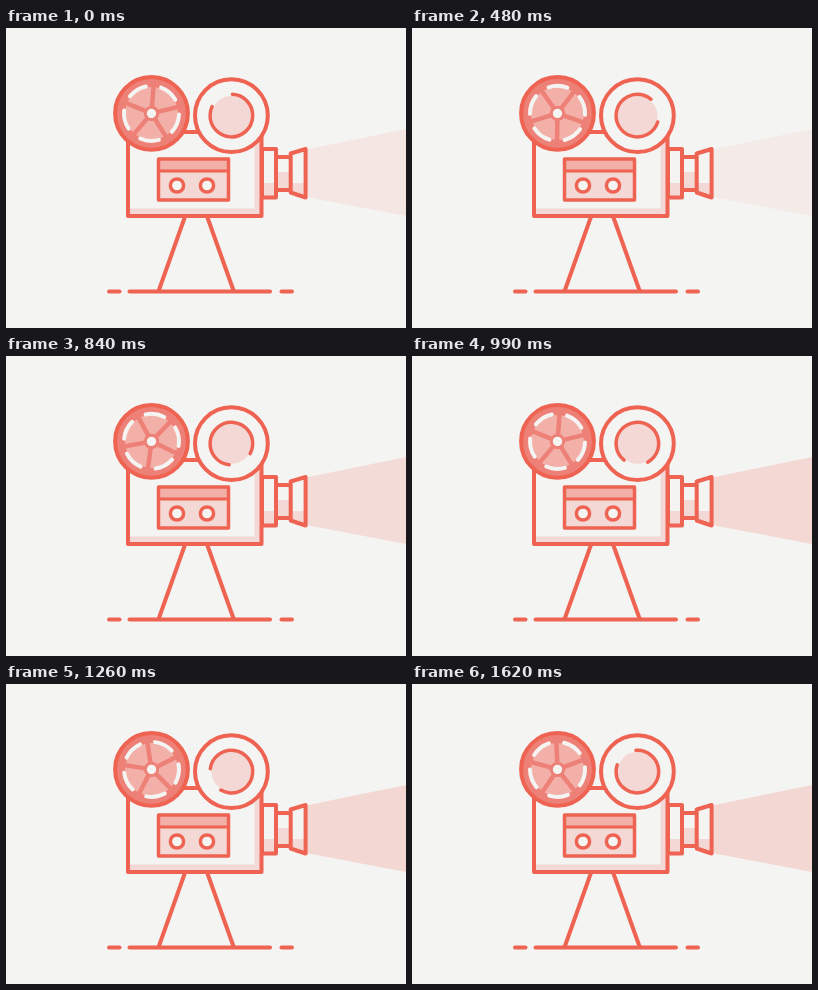
An HTML page with a canvas that plays this animation: 400 px wide and 300 px high, repeating every 1650 ms.

```html
<!DOCTYPE html>
<html lang="en">
<head>
<meta charset="utf-8">
<title>Film projector</title>
<style>
html, body { margin: 0; width: 100%; height: 100%; overflow: hidden; background: #f4f4f2; }
canvas { display: block; width: 400px; height: 300px; }
</style>
</head>
<body>
<canvas id="stage" width="400" height="300"></canvas>
<script>
const ctx = document.getElementById('stage').getContext('2d');
const LOOP = 1650, STEP = 30, TAU = Math.PI * 2;
const CORAL = '#ee6352', PAPER = '#f4f4f2';
const PALE = '#f4d8d5', ROSE = '#f2b0a9', REEL = '#ee8177';
// time in ms, beam opacity
const BEAM = [[0, .09], [210, .12], [480, .065], [540, .14], [840, .17], [1110, .2], [1650, .2]];

function paint(fill, stroke, width) {
  if (fill) { ctx.fillStyle = fill; ctx.fill(); }
  if (stroke) {
    ctx.strokeStyle = stroke;
    ctx.lineWidth = width;
    ctx.stroke();
  }
}

function shape(points, fill, stroke, width = 4) {
  ctx.beginPath();
  points.forEach(([x, y]) => ctx.lineTo(x, y));
  if (points.length > 2) ctx.closePath();
  paint(fill, stroke, width);
}

function box(x, y, w, h, fill, stroke, width) {
  shape([[x, y], [x + w, y], [x + w, y + h], [x, y + h]], fill, stroke, width);
}

function circle(x, y, r, fill, stroke, width = 4) {
  ctx.beginPath();
  ctx.arc(x, y, r, 0, TAU);
  paint(fill, stroke, width);
}

function arc(r, from, to, color, width) {
  ctx.beginPath();
  ctx.arc(0, 0, r, from, to);
  paint(null, color, width);
}

function line(x1, y1, x2, y2, width = 4) {
  shape([[x1, y1], [x2, y2]], null, CORAL, width);
}

function beamAlpha(t) {
  const i = BEAM.findIndex(key => key[0] > t);
  const [t0, a0] = BEAM[i - 1], [t1, a1] = BEAM[i];
  return a0 + (a1 - a0) * (t - t0) / (t1 - t0);
}

function drawBeam(t) {
  ctx.globalAlpha = beamAlpha(t);
  shape([[300, 121.5], [400, 101], [400, 188], [300, 169]], CORAL);
  ctx.globalAlpha = 1;
}

function drawStand() {
  line(178.9, 189, 152.6, 263);
  line(201.3, 189, 227.7, 263);
  line(123.5, 263.6, 264, 263.6);
  line(103, 263.6, 113.5, 263.6);
  line(275.5, 263.6, 286, 263.6);
}

function drawLens() {
  box(270, 129, 15, 33, PAPER);
  box(270, 144, 15, 18, PALE);
  box(270, 129, 15, 33, null, CORAL);
  box(256, 121, 14, 48.5, PAPER);
  box(256, 155, 14, 14.5, PALE);
  box(256, 121, 14, 48.5, null, CORAL);
  const hood = [[284.7, 125.5], [299.6, 121], [299.6, 169.5], [284.7, 164.5]];
  shape(hood, PAPER);
  shape([[284.7, 155], [299.6, 155], ...hood.slice(2)], PALE);
  shape(hood, null, CORAL);
}

function drawBody() {
  box(122, 104, 133.5, 84, PAPER);
  box(122, 180.5, 133.5, 7.5, PALE);
  box(248.5, 104, 7, 84, PALE);
  box(122, 104, 133.5, 84, null, CORAL);
  box(152.5, 131, 70, 41, PALE);
  box(152.5, 131, 70, 12, ROSE);
  line(153, 143, 222, 143, 3);
  box(152.5, 131, 70, 41, null, CORAL, 3.5);
  circle(171, 157.5, 6.6, PAPER, CORAL, 3.5);
  circle(201, 157.5, 6.6, PAPER, CORAL, 3.5);
}

function drawReel(turn) {
  circle(145.5, 85.4, 36.4, REEL, CORAL);
  ctx.save();
  ctx.translate(145.5, 85.4);
  ctx.rotate(turn - .24);
  circle(0, 0, 26.5, ROSE);
  for (let i = 0; i < 5; i++) {
    arc(27.5, .28, TAU / 5 - .28, PAPER, 4);
    shape([[0, 0], [26.5, 0]], null, REEL, 4.5);
    ctx.rotate(TAU / 5);
  }
  circle(0, 0, 6.2, PAPER, REEL, 3);
  ctx.restore();
}

function drawSpool(turn) {
  circle(225.4, 87.6, 36.4, PAPER, CORAL);
  circle(225.6, 87.8, 20, PALE);
  ctx.save();
  ctx.translate(225.4, 87.6);
  ctx.rotate(turn);
  arc(21.3, 4.76, 3.58 + TAU, CORAL, 3.5);
  ctx.restore();
}

function draw(now) {
  const t = Math.floor(now % LOOP / STEP) * STEP;
  const turn = t / LOOP * TAU;
  ctx.fillStyle = PAPER;
  ctx.fillRect(0, 0, 400, 300);
  ctx.lineCap = ctx.lineJoin = 'round';
  drawBeam(t);
  drawStand();
  drawLens();
  drawBody();
  drawReel(turn);
  drawSpool(turn);
}

let start;
function tick(now) {
  start ??= now;
  draw(now - start);
  requestAnimationFrame(tick);
}
draw(0);
requestAnimationFrame(tick);
</script>
</body>
</html>
```
